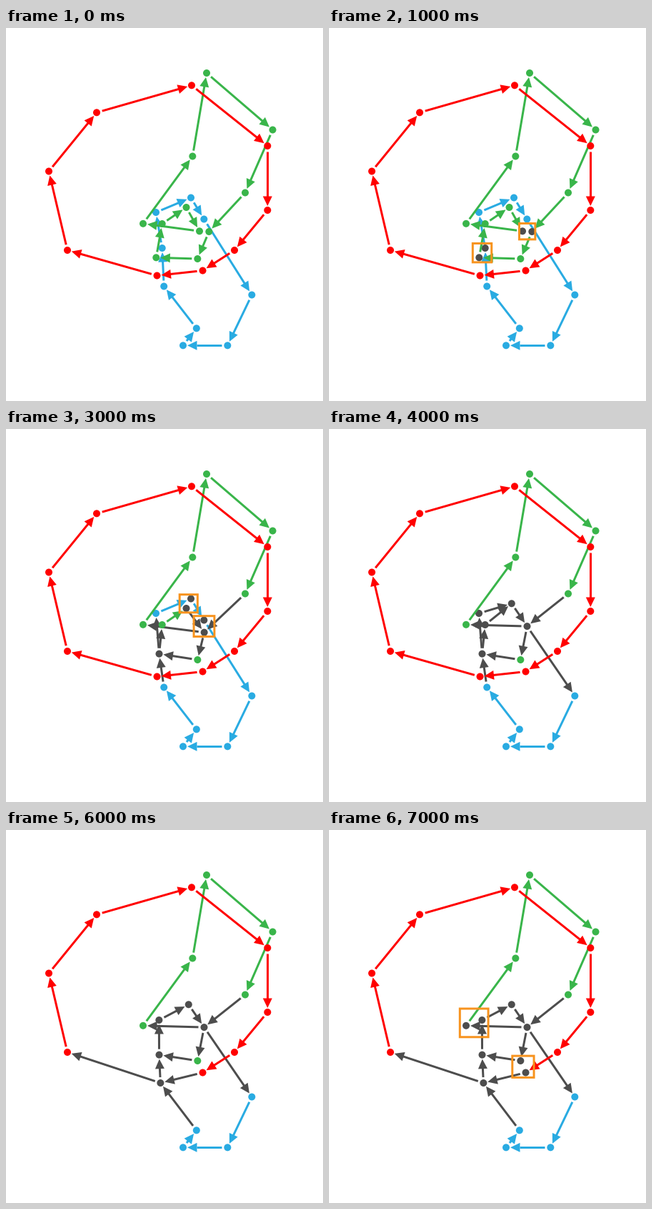
A matplotlib script for the animation above (8 s loop, 444 by 522 pixels).

```python
import numpy as np
import matplotlib.pyplot as plt
from matplotlib.animation import FuncAnimation
from matplotlib.patches import Circle, Polygon, Rectangle

W, H, DPI = 444, 522, 100
LINE = 3 * 72 / DPI
DARK, ORANGE = "#4d4d4d", "#f7931e"
COLORS = {"b": "#29abe2", "g": "#39b54a", "r": "#ff0000"}
LAYERS = [COLORS["b"], DARK, COLORS["g"], COLORS["r"]]
DOT_R, HEAD_LEN, HEAD_W = 5, 13.5, 13
START_GAP, TIP_GAP = 8, 6
BOX_SCALE = 1.68

# Corners of three closed loops; each corner points to the next
LOOPS = {
    "b": [(210, 258), (259, 237.5), (277.3, 267.5), (344.3, 373.5), (310.3, 444.3),
          (248, 444.3), (266.8, 420.3), (221.2, 361.5), (218.7, 308)],
    "g": [(281, 63), (373.5, 142.5), (335, 230.5), (284.3, 285), (268.3, 323),
          (210.3, 321.3), (218.7, 274), (252.5, 251), (271, 284.3),
          (192, 273.8), (261.3, 179.5)],
    "r": [(127, 118.3), (260, 80.3), (366.3, 165), (366.3, 255), (320, 311),
          (275.5, 339.5), (211.5, 346.5), (86, 311), (60, 200.5)],
}
POINTS = {f"{k}{i}": np.array(p) for k, loop in LOOPS.items()
          for i, p in enumerate(loop)}
LINKS = [(f"{k}{i}", f"{k}{(i + 1) % len(loop)}") for k, loop in LOOPS.items()
         for i in range(len(loop))]

# Pairs merged in each round
ROUNDS = [[("g5", "b8"), ("g3", "g8")],
          [("g7", "b1"), ("g3", "b2")],
          [("g6", "b0"), ("r6", "b7")],
          [("g9", "g6"), ("r5", "g4")]]

fig = plt.figure(figsize=(W / DPI, H / DPI), dpi=DPI, facecolor="white")
ax = fig.add_axes([0, 0, 1, 1])


def merge(count):
    """Graph after the given number of rounds: dots, links, merged names."""
    pos, home, merged = dict(POINTS), {n: n for n in POINTS}, set()
    for a, b in sum(ROUNDS[:count], []):
        pos[a] = (pos[a] + pos.pop(b)) / 2
        home = {n: a if h == b else h for n, h in home.items()}
        merged.add(a)
    links = list(dict.fromkeys((home[u], home[v]) for u, v in LINKS))
    return pos, links, merged


def arrow(a, b, color):
    along = (b - a) / np.hypot(*(b - a))
    side = np.array([-along[1], along[0]]) * HEAD_W / 2
    start, tip = a + along * START_GAP, b - along * TIP_GAP
    base = tip - along * HEAD_LEN
    z = LAYERS.index(color)
    ax.plot(*zip(start, base + along), color=color, lw=LINE,
            solid_capstyle="butt", zorder=z)
    ax.add_patch(Polygon([tip, base + side, base - side], fc=color, lw=0, zorder=z))


def box(a, b):
    side = BOX_SCALE * np.hypot(*(b - a))
    corner = (a + b) / 2 - side / 2
    ax.add_patch(Rectangle(corner, side, side, fill=False, ec=ORANGE,
                           lw=LINE, zorder=9, snap=False))


def draw(step):
    count, marking = divmod(step, 2)
    pos, links, merged = merge(count)
    ax.clear()
    ax.set(xlim=(0, W), ylim=(H, 0))
    ax.axis("off")

    for u, v in links:
        arrow(pos[u], pos[v], DARK if merged & {u, v} else COLORS[u[0]])

    dark = set(merged)
    for pair in ROUNDS[count]:
        # A pair with only dark arrows darkens before it is marked
        touching = [link for link in links if set(link) & set(pair)]
        if marking or all(merged & set(link) for link in touching):
            dark |= set(pair)
        if marking:
            box(*(pos[n] for n in pair))

    for name, p in pos.items():
        color = DARK if name in dark else COLORS[name[0]]
        ax.add_patch(Circle(p, DOT_R, fc=color, lw=0,
                            zorder=LAYERS.index(color) + 0.5))
    return []


anim = FuncAnimation(fig, draw, frames=2 * len(ROUNDS), init_func=lambda: [],
                     interval=1000, repeat=True, repeat_delay=0)
plt.show()
```
